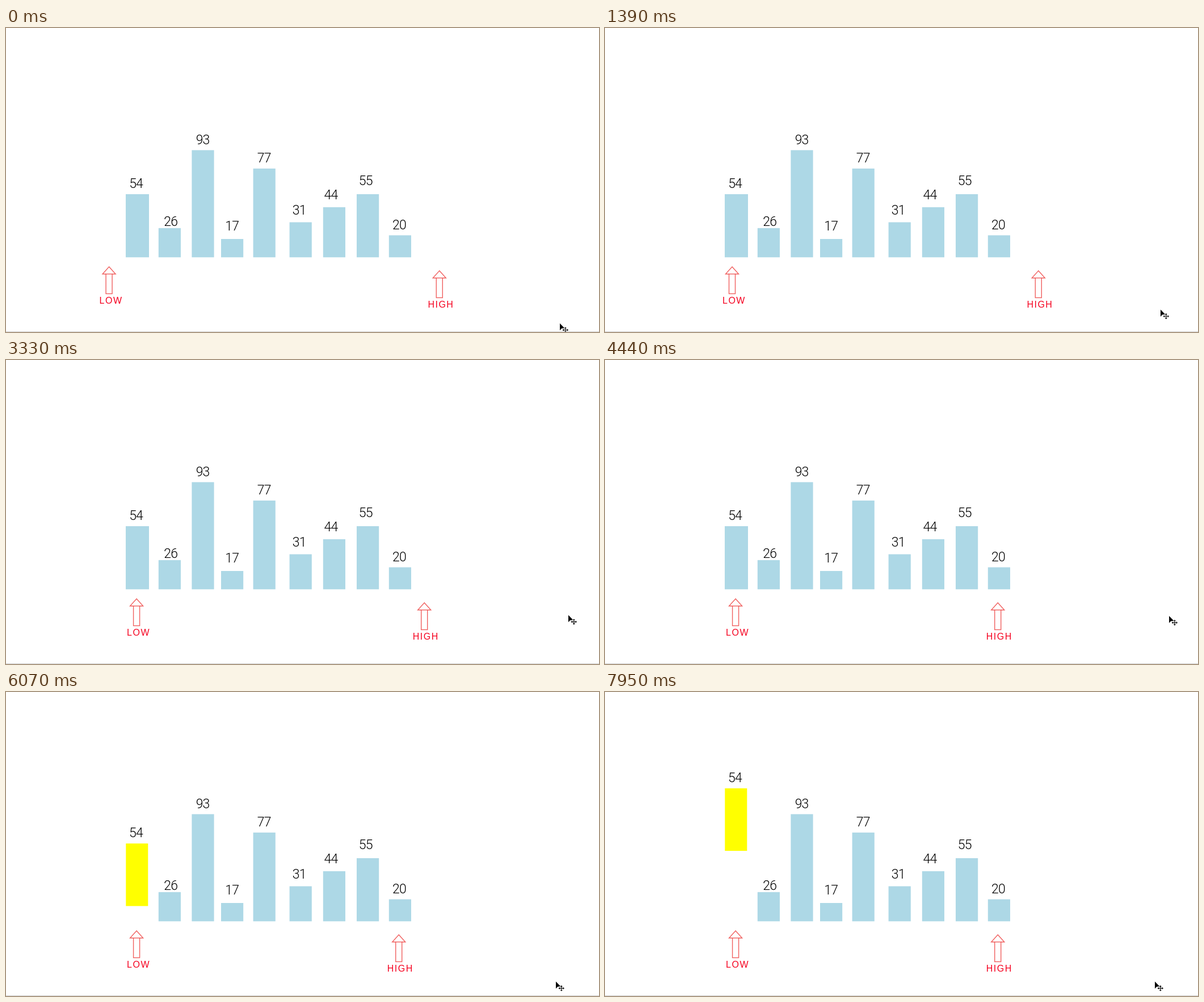
Animation, 1045 px wide and 536 px high, one loop 7.99 s. Source, as an HTML page:

```html
<!DOCTYPE html>
<html lang="en">
<head>
<meta charset="utf-8">
<title>Partition step</title>
<style>
  html, body { margin: 0; width: 100%; height: 100%; overflow: hidden; background: #fff; }
  svg { display: block; width: 1045px; height: 536px; }
  .num { font: 300 23px Roboto, "Open Sans", sans-serif; letter-spacing: -.8px; text-anchor: middle; fill: #000; }
  .tag { font: 16px "Liberation Sans", Arial, sans-serif; letter-spacing: 1.5px; fill: #f5001f; }
  .arrow { fill: #fff; stroke: #f0605f; stroke-width: 1.4; }
</style>
</head>
<body>
<svg id="stage" viewBox="0 0 1045 536">
  <rect y="535" width="1045" height="1" fill="#cfcfcf"/>
</svg>
<script>
const LOOP = 7990, TICK = 40;
const BASE = 404.3, BAR_WIDTH = 39.2, BLUE = '#add8e6', YELLOW = '#ff0';
const stage = document.getElementById('stage');

function add(parent, tag, attrs, text) {
  const node = document.createElementNS('http://www.w3.org/2000/svg', tag);
  for (const key in attrs) node.setAttribute(key, attrs[key]);
  if (text !== undefined) node.textContent = text;
  parent.appendChild(node);
  return node;
}

const move = (node, x, y) => node.setAttribute('transform', `translate(${x} ${y})`);
const show = (node, on) => node.setAttribute('visibility', on ? 'visible' : 'hidden');

// The label's centre sits `shift` right of the bar's middle and `gap` above its top.
function addBar({ value, x, top, shift = 0, gap = 19, width = BAR_WIDTH, fill = BLUE }) {
  const group = add(stage, 'g', {});
  add(group, 'rect', { x, y: top, width, height: BASE - top, fill });
  add(group, 'text', { class: 'num', x: x + width / 2 + shift - .4, y: top - gap + 8.2 }, value);
  return group;
}

function addPointer(label, x, y) {
  const group = add(stage, 'g', {});
  add(group, 'path', { class: 'arrow', d: `M${x} ${y}l11.5 12.7h-23z` });
  add(group, 'rect', { class: 'arrow', x: x - 5.5, y: y + 12.7, width: 11, height: 34.8 });
  add(group, 'text', { class: 'tag', x: x - (label === 'LOW' ? 17 : 20.4), y: y + 65 }, label);
  return group;
}

const pivotBlue = addBar({ value: 54, x: 211, top: 293, shift: -2, width: 41 });
[
  { value: 26, x: 268.8, top: 352.8, shift: 2.3, gap: 12.3 },
  { value: 93, x: 327.4, top: 215.4 },
  { value: 17, x: 379, top: 372, gap: 23.5 },
  { value: 77, x: 435.6, top: 247.8 },
  { value: 31, x: 499.6, top: 342.5, shift: -2, gap: 22 },
  { value: 44, x: 558.8, top: 316, shift: -5.5, gap: 22 },
  { value: 55, x: 618, top: 293, shift: -3.5, gap: 24 },
  { value: 20, x: 674.8, top: 365.5, shift: -1 }
].forEach(addBar);
const pivotYellow = addBar({ value: 54, x: 211.3, top: 294, shift: -1.4, width: 39, fill: YELLOW });

const low = addPointer('LOW', 181.6, 421);
const high = addPointer('HIGH', 763.8, 428);

const cursor = add(stage, 'g', {});
add(cursor, 'path', { d: 'M0 0v12.5l3-3.4 5.2-.6z' });
for (const angle of [0, 90, 180, 270]) {
  add(cursor, 'path', {
    d: 'M0 0h4.4m-1.5-1.5l1.5 1.5-1.5 1.5',
    transform: `translate(9.8 11.8) rotate(${angle})`,
    fill: 'none', stroke: '#111', 'stroke-width': 1.1
  });
}

// Presses of a held key: one at once, then one per tick after the repeat delay.
function presses(t, first, repeat, last = LOOP) {
  if (t < first) return 0;
  const held = Math.min(t, last) - repeat;
  return held < 0 ? 1 : 2 + Math.floor(held / TICK);
}

// The pointer rests between glides.
const cursorHome = { x: 976, y: 521 };
const glides = [
  { from: 0, to: 80, x: 979, y: 496.5 },
  { from: 1710, to: 1830, x: 1030, y: 472 },
  { from: 2220, to: 2460, x: 991, y: 449.8 },
  { from: 4400, to: 4440, x: 994, y: 451 },
  { from: 4440, to: 4680, x: 1009, y: 526 },
  { from: 4680, to: 4920, x: 969, y: 510.6 }
];

function cursorAt(t) {
  return glides.reduce((p, g) => {
    const k = Math.max(0, Math.min(1, (t - g.from) / (g.to - g.from)));
    return { x: p.x + (g.x - p.x) * k, y: p.y + (g.y - p.y) * k };
  }, cursorHome);
}

function render(t) {
  move(low, 2.02 * presses(t, 470, 630, 1510), 0);
  move(high, -2.045 * presses(t, 2730, 2890, 4210), 0);
  move(pivotYellow, 0, -2.07 * presses(t, 5390, 5630));
  const swapped = t >= 4680;
  show(pivotBlue, !swapped);
  show(pivotYellow, swapped);
  const p = cursorAt(t);
  move(cursor, p.x, p.y);
  show(cursor, t < 1830 || t >= 2260);
}

const start = performance.now();
function loop() {
  render((performance.now() - start) % LOOP);
  requestAnimationFrame(loop);
}
render(0);
requestAnimationFrame(loop);
</script>
</body>
</html>
```
